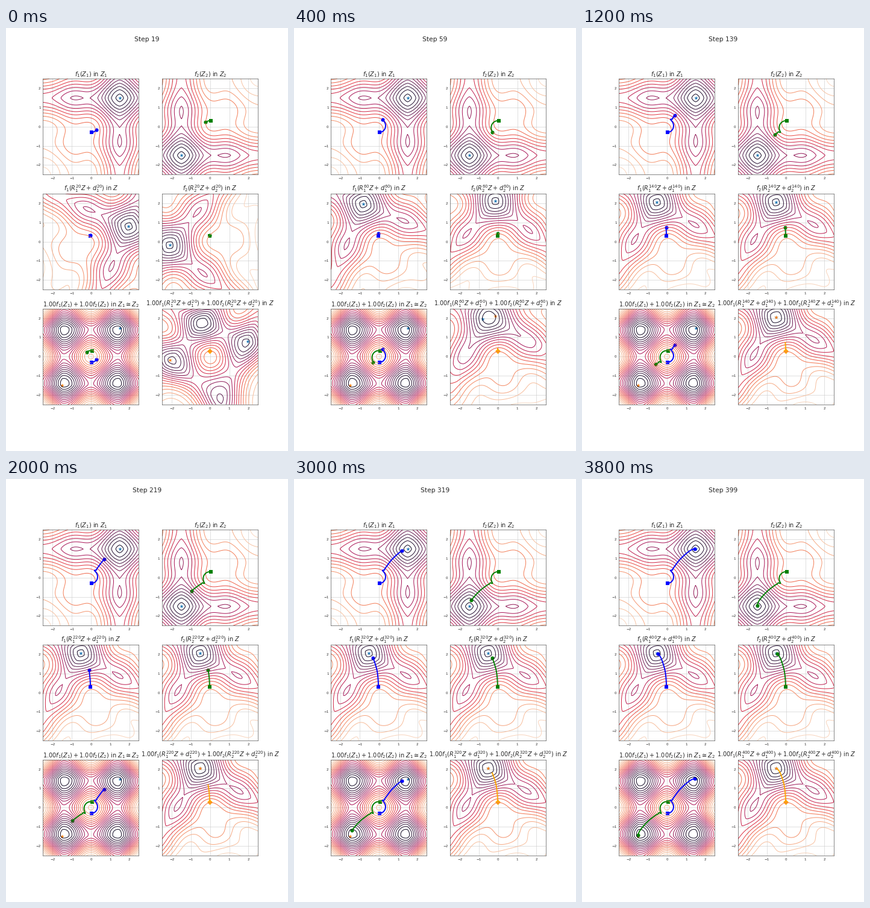
Recreate the animation shown at these times as a matplotlib script. Size 468 by 702 pixels, loop 4 s.

```python
import numpy as np
import matplotlib.pyplot as plt
from matplotlib.animation import FuncAnimation
from matplotlib.colors import LinearSegmentedColormap

FRAMES, STRIDE = 20, 20
INK = "#262626"
BLUE, ORANGE = "#1f77b4", "#ff7f0e"
ROCKET = LinearSegmentedColormap.from_list("rocket", [
    "#03051a", "#35193e", "#701f57", "#ad1759",
    "#e13342", "#f37651", "#f6b48f", "#faebdd"])

plt.rcParams.update({
    "font.family": "DejaVu Sans", "text.color": INK,
    "axes.edgecolor": INK, "axes.linewidth": 0.55, "axes.axisbelow": True,
    "grid.color": "#cccccc", "grid.linewidth": 0.6,
})


def well(u):
    return np.abs(u) - 3 * np.sinc(3 * u / np.pi)


def f1(x, y):
    return well(x - 1.5) + well(y - 1.5)


def f2(x, y):
    return f1(-x, -y)


def hermite(t, keys, vals):
    """Smooth curve through the given keys."""
    keys, vals = np.asarray(keys, float), np.asarray(vals, float)
    slope = np.gradient(vals, keys)
    i = np.clip(np.searchsorted(keys, t, side="right") - 1, 0, len(keys) - 2)
    h = keys[i + 1] - keys[i]
    s = (t - keys[i]) / h
    return ((1 + 2 * s) * (1 - s) ** 2 * vals[i]
            + s * (1 - s) ** 2 * h * slope[i]
            + s * s * (3 - 2 * s) * vals[i + 1]
            + s * s * (s - 1) * h * slope[i + 1])


def rotate(x, y, a):
    return x * np.cos(a) - y * np.sin(a), x * np.sin(a) + y * np.cos(a)


# The first task's matrix also swaps the axes, the second is a pure rotation.
def to_z1(x, y, a):
    return rotate(x, y, a)[::-1]


def to_z2(x, y, a):
    return rotate(x, y, a)


steps = np.arange(FRAMES * STRIDE)
turn_keys = [0, 19, 39, 54, 62, 79, 99, 125, 160, 400]
ang1 = np.radians(hermite(steps, turn_keys, [
    79, 23, -33, -66, -67.5, -58, -59.7, -59.4, -59.4, -59.4]))
ang2 = np.radians(hermite(steps, turn_keys, [
    -16, 40, 96, 129.3, 130.9, 119.8, 121.9, 120.7, 120.6, 120.6]))

z_keys = [0, 19, 59, 99, 139, 219, 319, 399]
zx = hermite(steps, z_keys, [-.03, -.03, -.03, -.035, -.045, -.105, -.31, -.47])
zy = hermite(steps, z_keys, [.30, .325, .42, .55, .725, 1.18, 1.81, 2.04])
path_z = np.column_stack([zx, zy])
path_1 = np.column_stack(to_z1(zx, zy, ang1))
path_2 = np.column_stack(to_z2(zx, zy, ang2))

X, Y = np.meshgrid(*[np.linspace(-2.5, 2.5, 100)] * 2)

fig, axes = plt.subplots(3, 2, figsize=(6.5, 9.75), dpi=72)
fig.patch.set_facecolor("white")
(ax_f1, ax_f2), (ax_r1, ax_r2), (ax_sum, ax_joint) = axes
heading = fig.suptitle("", fontsize=10.6, y=0.98)

for ax in axes.flat:
    ax.set(xlim=(-2.5, 2.5), ylim=(-2.5, 2.5), aspect="equal",
           xticks=range(-2, 3), yticks=range(-2, 3))
    ax.tick_params(length=0, pad=3.9, labelsize=5.6, labelcolor=INK)
    ax.grid(True)


def contours(ax, values):
    return ax.contour(X, Y, values, levels=20, cmap=ROCKET, linewidths=1.0)


def title(ax, text):
    ax.set_title(text, fontsize=9.75, pad=4)


def star(ax, x, y, color=BLUE):
    return ax.scatter([x], [y], s=46, marker="*", color=color,
                      linewidths=0, zorder=1)


class Trail:
    """A path with a fixed start marker and an optional moving head."""

    def __init__(self, ax, path, color, marker="s", size=36, head=True):
        self.path = path
        ax.scatter(*path[0], s=size, marker=marker, color=color,
                   linewidths=0, zorder=1.2)
        self.line, = ax.plot([], [], color=color, lw=1.9, zorder=2.5)
        self.head = None
        if head:
            self.head = ax.scatter([0], [0], s=38, color=color,
                                   linewidths=0, zorder=1.3)

    def show(self, k):
        self.line.set_data(*self.path[:k + 1].T)
        if self.head:
            self.head.set_offsets(self.path[k:k + 1])


contours(ax_f1, f1(X, Y))
contours(ax_f2, f2(X, Y))
contours(ax_sum, f1(X, Y) + f2(X, Y))
title(ax_f1, r"$f_1(Z_1)$ in $Z_1$")
title(ax_f2, r"$f_2(Z_2)$ in $Z_2$")
title(ax_sum, r"$1.00f_1(Z_1)+1.00f_2(Z_2)$ in $Z_1\cong Z_2$")

for ax in (ax_f1, ax_sum):
    star(ax, 1.5, 1.5)
star(ax_f2, -1.5, -1.5)
star(ax_sum, -1.5, -1.5, ORANGE)
stars_1 = [star(ax_r1, 0, 0), star(ax_joint, 0, 0)]
stars_2 = [star(ax_r2, 0, 0), star(ax_joint, 0, 0, ORANGE)]

trails = [
    Trail(ax_f1, path_1, "blue"),
    Trail(ax_f2, path_2, "green"),
    Trail(ax_r1, path_z, "blue"),
    Trail(ax_r2, path_z, "green"),
    Trail(ax_sum, path_1, "blue"),
    Trail(ax_sum, path_2, "green"),
    Trail(ax_joint, path_z, "orange", "D", 40, head=False),
]
moving = []


def update(i):
    k = STRIDE * i + STRIDE - 1
    a1, a2 = ang1[k], ang2[k]
    while moving:
        moving.pop().remove()

    v1 = f1(*to_z1(X, Y, a1))
    v2 = f2(*to_z2(X, Y, a2))
    for ax, values in ((ax_r1, v1), (ax_r2, v2), (ax_joint, v1 + v2)):
        moving.append(contours(ax, values))

    for s in stars_1:
        s.set_offsets([rotate(1.5, 1.5, -a1)])
    for s in stars_2:
        s.set_offsets([rotate(-1.5, -1.5, -a2)])
    for trail in trails:
        trail.show(k)

    g1, g2 = (rf"f_{n}(R_{n}^{{{k + 1}}}Z+d_{n}^{{{k + 1}}})" for n in (1, 2))
    title(ax_r1, rf"${g1}$ in $Z$")
    title(ax_r2, rf"${g2}$ in $Z$")
    title(ax_joint, rf"$1.00{g1}+1.00{g2}$ in $Z$")
    heading.set_text(f"Step {k}")
    return []


anim = FuncAnimation(fig, update, frames=FRAMES, interval=200,
                     init_func=lambda: update(0), repeat=True, repeat_delay=0)
plt.show()
```
